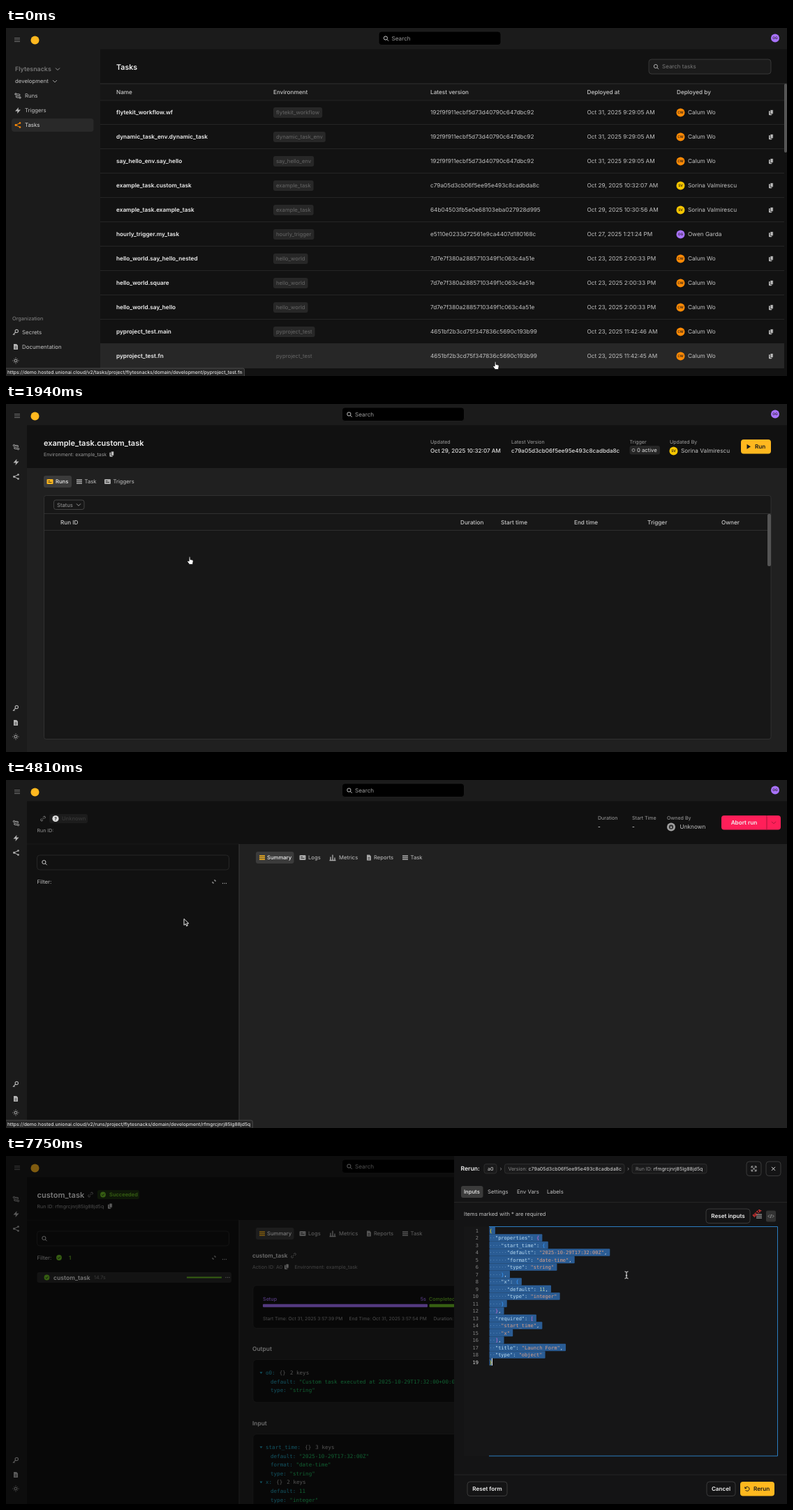
Animation of 1119 by 500 pixels, one loop 8000 ms. Source, as an HTML page:

```html
<!DOCTYPE html>
<html lang="en">
<head>
<meta charset="utf-8">
<title>Task console</title>
<style>
html, body { margin: 0; width: 100%; height: 100%; overflow: hidden; background: #1b1b1b; }
svg { display: block; }
text { white-space: pre; text-rendering: geometricPrecision; font-family: Inter, sans-serif; }
.mono, .mono text { font-family: "DejaVu Sans Mono", monospace; }
</style>
</head>
<body>
<svg id="stage" width="1119" height="500" viewBox="0 0 1119 500"></svg>
<script>
const ctx = document.createElement('canvas').getContext('2d');
const width = (s, size, weight = 400) => {
  ctx.font = `${weight} ${size}px Inter, sans-serif`;
  return ctx.measureText(s).width;
};

// Drawing helpers: text is centred vertically on y, boxes go from corner to corner
const WHITE = '#f0f0f0', SOFT = '#c2c2c2', DIM = '#858585', GREEN = '#6cc024', PURPLE = '#a872ff', GOLD = '#ffb81f';
const T = (x, y, s, size = 8.25, fill = SOFT, weight = 400, anchor = 'start') =>
  `<text x="${x}" y="${y + size * .36}" font-size="${size}" fill="${fill}" font-weight="${weight}" text-anchor="${anchor}">${s}</text>`;
const R = (x, y, x2, y2, fill, r = 0, stroke = 'none') =>
  `<rect x="${x}" y="${y}" width="${x2 - x}" height="${y2 - y}" rx="${r}" fill="${fill}" stroke="${stroke}" stroke-width=".8"/>`;
const C = (x, y, r, fill, stroke = 'none') => `<circle cx="${x}" cy="${y}" r="${r}" fill="${fill}" stroke="${stroke}"/>`;
const P = (x, y, d, stroke, fill = 'none', w = 1) =>
  `<path transform="translate(${x} ${y})" d="${d}" stroke="${stroke}" fill="${fill}" stroke-width="${w}" stroke-linejoin="round"/>`;
const hline = (x, x2, y, color = '#2a2a2a') => P(x, y, `M0 0H${x2 - x}`, color, 'none', .8);

// Icons
const copy = (x, y, c = '#bdbdbd') => R(x - 3, y - 2.5, x + 1.5, y + 3.8, c, 1) + R(x - 1, y - 4, x + 3.2, y + 2.2, c, 1, '#151515');
const link = (x, y) => P(x, y, 'M-1 1L1 -1M0 -2L1.2 -3.2A1.5 1.5 0 0 1 3.2 -1.2L2 0M0 2L-1.2 3.2A1.5 1.5 0 0 1 -3.2 1.2L-2 0', '#999', 'none', .9);
const lens = (x, y, c = '#ccc') => P(x, y, 'M2 -.5A2.6 2.6 0 1 1 -3.2 -.5A2.6 2.6 0 1 1 2 -.5M1.3 1.4L3.6 3.7', c);
const chevron = (x, y, c = '#999') => P(x, y, 'M-3 -1.5L0 1.5L3 -1.5', c);
const check = (x, y) => C(x, y, 3.9, GREEN) + P(x, y, 'M-1.8 .1L-.5 1.4L1.8 -1.2', '#151515', 'none', .9);
const failed = (x, y) => C(x, y, 3.9, '#f0392b') + P(x, y, 'M0 -2V.6M0 1.2V2', '#151515');
const dots = (x, y) => [-2.5, 0, 2.5].map(d => C(x + d, y, .65, '#aaa')).join('');
const kebab = (x, y) => [-2.8, 0, 2.8].map(d => C(x, y + d, .65, '#999')).join('');
const bars = (x, y, c) => P(x, y, 'M-4 -2.5H4M-4 0H4M-4 2.5H4', c, 'none', 1.5);
const box = (x, y, c) => R(x - 4.5, y - 3.5, x + 4.5, y + 3.5, c, 1) + P(x, y, 'M-2.5 -1H0M-2.5 1H2.5', '#222', 'none', .8);
const chart = (x, y) => P(x, y, 'M-3 4V-1M0 4V-4M3 4V0M-4.5 4H4.5', '#aaa', 'none', 1.4);
const page = (x, y, c = '#aaa') => P(x, y, 'M-3 -4H1L3 -2V4H-3Z', 'none', c) + P(x, y, 'M-1.5 0H1.5M-1.5 2H1.5', '#1b1b1b', 'none', .7);
const rerun = (x, y) => P(x, y, 'M-2.8 -1A3 3 0 1 1 -2.6 1.5M-3.2 -3V-.8H-1', '#1a1a1a');
const brackets = (x, y, c) => P(x, y, 'M-2 -2L-4 0L-2 2M2 -2L4 0L2 2M.6 -2.5L-.6 2.5', c, 'none', .8);
const flow = (x, y, c) => C(x - 3, y - 2.5, 1.2, 'none', c) + C(x + 3, y + 2.5, 1.2, 'none', c) + P(x, y, 'M-1.5 -2.5H1.5Q3.5 -2.5 3 -.8Q2.5 0 0 0T-3 .8Q-3 2.5 -1 2.5H1.5', c);
const bolt = (x, y, c) => P(x, y, 'M1 -4.5L-4 1H-.5L-1 4.5L4 -1H.5Z', 'none', c);
const share = (x, y, c) => P(x, y, 'M3 -3L-3 0L3 3', c) + C(x - 3, y, 1.4, c) + C(x + 3, y - 3, 1.3, c) + C(x + 3, y + 3, 1.3, c);
const key = (x, y) => P(x, y, 'M3.5 -1.5A2.2 2.2 0 1 1 -.9 -1.5A2.2 2.2 0 1 1 3.5 -1.5M-.2 0L-4 3.8M-2.8 2.6L-1.5 3.8', '#b5b5b5', 'none', 1.2);
const sun = (x, y) => C(x, y, 1.9, 'none', '#b5b5b5') + P(x, y, 'M0 -4.5V-3.4M0 3.4V4.5M-4.5 0H-3.4M3.4 0H4.5M-3 -3L-2.4 -2.4M3 3L2.4 2.4M3 -3L2.4 -2.4M-3 3L-2.4 2.4', '#b5b5b5', 'none', .9);

const people = {
  CW: ['Calum Wo', '#ff8a05'],
  SV: ['Sorina Valmirescu', '#f7c600'],
  OG: ['Owen Garda', PURPLE],
};
const avatar = (x, y, id) => people[id]
  ? C(x, y, 6, people[id][1]) + T(x, y, id, 4.9, '#2a2015', 600, 'middle')
  : C(x, y, 6, '#a0a0a0') + C(x, y, 3.2, '#333') + C(x, y + .4, 1.4, '#a0a0a0');
const person = (x, y, id) => avatar(x, y, id) + T(x + 10.5, y, people[id][0]);
const field = (x, y, label, value) => T(x, y, label, 7.1, '#a0a0a0') + T(x, y + 13, value, 8.1, '#e0e0e0', 500);

// Top bar and sidebar, either wide or collapsed
function shell(wide) {
  const sx = wide ? 534 : 481.5;
  let s = R(0, 0, 1119, 500, '#1b1b1b') + P(16, 17, 'M-4 -2.5H4M-4 0H4M-4 2.5H4', '#777', 'none', .9) + C(41.5, 17.5, 6, GOLD)
    + R(sx, 5, sx + 175, 24.5, '#000', 4, '#222') + lens(sx + 10.5, 15) + T(sx + 18.5, 15, 'Search', 8.2, '#9a9a9a') + avatar(1102, 14.5, 'OG');
  if (!wide) {
    return s + flow(14.5, 62, '#b5b5b5') + bolt(14.5, 83.5, '#b5b5b5') + share(14.5, 104.5, '#b5b5b5')
      + key(14, 437) + page(14, 458, '#b5b5b5') + sun(14, 478);
  }
  return s + R(8, 130, 125.5, 149, '#292929', 4)
    + T(13, 59, 'Flytesnacks', 8.9, '#777', 600) + chevron(74, 59) + T(13, 76.5, 'development', 7.8) + chevron(70, 76.5)
    + flow(17, 97.5, '#b5b5b5') + T(27, 97.5, 'Runs', 7.8) + bolt(17, 118.5, '#b5b5b5') + T(27, 118.5, 'Triggers', 7.8)
    + share(17, 139.5, '#ff8a05') + T(27, 139.5, 'Tasks', 7.8, '#ddd')
    + T(9, 417.5, 'Organization', 7.4, DIM) + key(14, 437) + T(23, 437, 'Secrets', 7.9) + page(14, 458, '#b5b5b5')
    + T(23, 458, 'Documentation', 7.9) + sun(14, 478);
}

// Task list
const HASH = ['192f9f911ecbf5d73d40790c647dbc92', 'c79a05d3cb06f5ee95e493c8cadbda8c', '64b04503fb5e0e68103eba027928d995',
  'e5110e0233d72561e9ca4407d180168c', '7d7e7f380a2885710349f1c063c4a51e', '4651bf2b3cd75f347836c5690c193b99'];
const tasks = [
  ['flytekit_workflow.wf', 0, '31, 2025 9:29:05 AM', 'CW'],
  ['dynamic_task_env.dynamic_task', 0, '31, 2025 9:29:05 AM', 'CW'],
  ['say_hello_env.say_hello', 0, '31, 2025 9:29:05 AM', 'CW'],
  ['example_task.custom_task', 1, '29, 2025 10:32:07 AM', 'SV'],
  ['example_task.example_task', 2, '29, 2025 10:30:56 AM', 'SV'],
  ['hourly_trigger.my_task', 3, '27, 2025 1:21:24 PM', 'OG'],
  ['hello_world.say_hello_nested', 4, '23, 2025 2:00:33 PM', 'CW'],
  ['hello_world.square', 4, '23, 2025 2:00:33 PM', 'CW'],
  ['hello_world.say_hello', 4, '23, 2025 2:00:33 PM', 'CW'],
  ['pyproject_test.main', 5, '23, 2025 11:42:46 AM', 'CW'],
  ['pyproject_test.fn', 5, '23, 2025 11:42:45 AM', 'CW'],
];
const heads = (y, list) => list.map(([x, s]) => T(x, y, s, 8.2, '#c8c8c8', 500)).join('');

function taskList() {
  const rows = tasks.map(([name, h, date, who], i) => {
    const y = 121.5 + 35 * i, env = name.split('.')[0];
    return T(158, y, name, 8.25, WHITE, 600) + R(383, y - 7.5, 391 + width(env, 7.75), y + 7.5, '#272727', 3) + T(387, y, env, 7.75, '#666')
      + T(608, y, HASH[h]) + T(832.5, y, 'Oct ' + date) + person(966.5, y, who) + copy(1096, y) + hline(135, 1115, y + 17);
  }).join('');
  return shell(true) + R(135, 30.5, 1119, 500, '#121212') + T(158, 56, 'Tasks', 10.7, WHITE, 600)
    + R(921, 45, 1096, 66, '#1b1b1b', 4, '#404040') + lens(931.5, 55.5, '#aaa') + T(940, 55.5, 'Search tasks', 8, '#777')
    + R(135, 80, 1119, 104, '#161616') + hline(135, 1119, 80, '#383838') + hline(135, 1115, 104)
    + heads(92.5, [[158, 'Name'], [383, 'Environment'], [608, 'Latest version'], [832.5, 'Deployed at'], [961, 'Deployed by']])
    + '<rect id="taskHover" x="135" width="980" height="35" fill="#272727"/>' + rows + R(1115, 80, 1119, 179, '#555', 2);
}

// Task detail with its runs
const runs = [
  ['rfmgrcjnrj85lg88jd5q', '14s', 'a few seconds ago', '-', 'OG'],
  ['rq4qwdm55tf5zl8mxkt5', '6s', '2 days ago', '-', 'SV'],
  ['rltxzvvch2sk75rjnrb6', '6s', '2 days ago', 'minutely'],
  ['rssldgkdqss4zcs82h49', '7s', '2 days ago', 'custom_cron'],
  ['rmf48hxnsd47jhw8jxz7', '6s', 'Oct 20, 2025 5:00 PM', 'custom_cron'],
  ['r6dh8hklhfmkdzjl8np7', '53s', 'Oct 20, 2025 2:59 PM', '-', 'OG'],
  ['r5qsmdcgwnpw66txt9sg', '5s', 'Oct 20, 2025 11:31 AM', 'minutely'],
  ['rcwv6sc55xl6hphln2nm', '5s', 'Oct 20, 2025 11:30 AM', 'minutely'],
  ['rlrwnyw5459kvrj266j2', '5s', 'Oct 20, 2025 11:29 AM', 'minutely'],
];

function taskPage() {
  const rows = runs.map(([id, took, when, trigger, who], i) => {
    const y = 199 + 35 * i, cell = (x, s) => T(x, y, s, 7.75);
    return R(78, y - 7, 98 + width(id, 7.4, 500), y + 7, '#2c2c2c', 3) + (took == '53s' ? failed : check)(87, y) + T(94, y, id, 7.4, '#ddd', 500)
      + cell(651, took) + cell(709, when) + cell(814, when) + cell(919, trigger) + avatar(1038.5, y, who) + kebab(1078, y) + hline(55, 1091, y + 17.5);
  }).join('');
  return shell(false) + R(30, 30.5, 1119, 92, '#111') + R(30, 92, 1119, 500, '#202020')
    + T(54, 56, 'example_task.custom_task', 11, WHITE, 600) + T(54, 72, 'Environment: example_task', 7, '#999') + copy(151.5, 72)
    + field(608, 54.5, 'Updated', 'Oct 29, 2025 10:32:07 AM') + field(724, 54.5, 'Latest Version', HASH[1])
    + T(893.5, 54.5, 'Trigger', 7.1, '#a0a0a0') + R(893.5, 60, 937, 72.5, '#262626', 3) + C(899, 66.3, 2, 'none', '#999') + T(904, 66.3, '0 active', 7.7, '#e0e0e0')
    + T(951, 54.5, 'Updated By', 7.1, '#a0a0a0') + person(956.5, 67.5, 'SV')
    + R(1053, 51, 1096, 71.5, GOLD, 4) + P(1064, 61.3, 'M-2.5 -3.5L3 0L-2.5 3.5Z', 'none', '#1a1a1a') + T(1073, 61.3, 'Run', 8.2, '#1a1a1a', 600)
    + R(54, 103, 94, 120, '#3b3b3b', 3) + box(63, 111.5, GOLD) + T(71, 111.5, 'Runs', 7.7, WHITE, 500) + bars(105, 111.5, '#aaa') + T(112.5, 111.5, 'Task', 7.7)
    + box(145.5, 111.5, '#aaa') + T(153.5, 111.5, 'Triggers', 7.7)
    + R(54.5, 131.5, 1096, 481.5, '#171717', 3, '#363636') + R(68.5, 138, 112, 151.5, 'none', 3, '#505050') + T(73, 144.8, 'Status', 7.7, '#999') + chevron(104, 144.8)
    + hline(54, 1096, 157.5, '#363636') + hline(54, 1091, 181.5, '#333')
    + heads(170, [[78, 'Run ID'], [651, 'Duration'], [709, 'Start time'], [814, 'End time'], [919, 'Trigger'], [1025, 'Owner']])
    + '<clipPath id="card"><rect x="54" y="150" width="1042" height="331"/></clipPath><g id="runRows" clip-path="url(#card)">'
    + '<rect id="runHover" x="55" width="1036" height="35" fill="#282828"/>' + rows + '</g>' + R(1091, 158, 1096, 233, '#555', 2);
}

// Run detail: frame, placeholder header and loaded content
const runFrame = () => shell(false) + R(30, 30.5, 1119, 500, '#111') + R(334, 92, 1119, 500, '#212121')
  + hline(30, 334, 92, '#1e1e1e') + P(334, 92, 'M0 0V408', '#383838')
  + R(44.5, 108, 319.5, 129, 'none', 4, '#2c2c2c') + lens(55, 118.5) + T(44.5, 146, 'Filter:', 7.7, '#aaa', 500)
  + P(298, 146, 'M1 -3V-1H3M-1 3V1H-3', '#aaa') + dots(313, 148.5)
  + R(358, 103, 412.5, 120, '#3b3b3b', 3) + bars(367, 111.5, GOLD) + T(374, 111.5, 'Summary', 7.7, WHITE, 500)
  + box(425, 111.5, '#aaa') + T(433, 111.5, 'Logs', 7.7) + chart(468, 111.5) + T(477, 111.5, 'Metrics', 7.7)
  + page(520, 111.5) + T(527, 111.5, 'Reports', 7.7) + bars(572, 111.5, '#aaa') + T(579.5, 111.5, 'Task', 7.7);

const runPending = () => link(53, 55.5) + R(62, 49, 117, 62, '#1c1c1c', 3) + C(71, 55.5, 4.6, '#ddd') + T(71, 55.5, '?', 6.5, '#111', 700, 'middle')
  + T(80, 55.5, 'Unknown', 7.6, '#383838', 500) + T(44.5, 72, 'Run ID:', 7, '#999')
  + field(848, 54.5, 'Duration', '-') + field(897, 54.5, 'Start Time', '-') + T(947, 54.5, 'Owned By', 7.1, '#a0a0a0') + avatar(953, 67.5) + T(965.5, 67.5, 'Unknown')
  + R(1025, 51, 1110, 71.5, '#ff1f59', 4) + T(1057.5, 61.3, 'Abort run', 8.2, WHITE, 600, 'middle') + P(1090, 51, 'M0 0V20.5', '#a8143b') + chevron(1100, 61.3, '#a8143b');

const span = (fill, s, dx = 0) => `<tspan fill="${fill}" dx="${dx}">${s}</tspan>`;
const KEY = '#24a7c4', STR = '#20c063';
const tree = (y, rows) => '<g class="mono">' + rows.map(([k, v, n], i) => {
  const cy = y + 12.55 * i;
  return n ? P(365.5, cy, 'M-2 -1.2H2L0 1.6Z', 'none', KEY) + T(372, cy, span(KEY, k + ':') + span('#aaa', ' {}', 1.5) + span('#aaa', ` ${n} keys`, 1.5), 7.57)
    : T(379, cy, span(KEY, k + ': ') + span(STR, v), 7.57);
}).join('') + '</g>';
const section = (y, name, y2) => T(353, y, name, 8.4, '#ddd', 600) + R(1036, y - 9, 1076, y + 9, '#151515', 3) + bars(1049, y, '#888')
  + R(1058, y - 7, 1074, y + 7, '#2c2c2c', 2) + brackets(1066, y, '#888') + copy(1092, y) + R(354, y + 16, 1099, y2, '#111', 5, '#2c2c2c');

const runLoaded = () => T(44.5, 56, 'custom_task', 11.1, WHITE, 600) + link(121, 55.5) + R(131, 49, 191, 62, '#1d3010', 3) + check(139, 55.5) + T(148, 55.5, 'Succeeded', 7.5, GREEN, 600)
  + T(44.5, 72, 'Run ID: ' + runs[0][0], 7, '#999') + copy(149, 72)
  + field(807, 54.5, 'Duration', '14.74s') + field(855.5, 54.5, 'Start Time', 'Oct 31, 2025 3:57:39 PM') + T(966, 54.5, 'Owned By', 7.1, '#a0a0a0') + person(972, 67.5, 'OG')
  + R(1047, 51, 1110, 71.5, GOLD, 4) + rerun(1065, 61.3) + T(1073, 61.3, 'Rerun', 8.2, '#1a1a1a', 600)
  + check(76, 146) + T(90, 146, '1', 7.7, GREEN, 600)
  + R(44.5, 167, 323, 182, '#262626', 3) + check(58.5, 174.5) + T(68, 174.5, 'custom_task', 8.6, WHITE, 600) + T(126, 174.5, '14.7s', 7.2, '#777') + R(259, 173.5, 309, 175.5, GREEN) + dots(317.5, 174.5)
  + R(1026, 104, 1096, 120, '#2b2b2b', 3) + T(1032, 111.8, 'Debug action', 7.9) + P(1088, 111.8, 'M-2.5 2.5L2.5 -2.5M-1.5 -2.5H2.5V1.5', '#bbb')
  + T(353, 143, 'custom_task', 8.25, '#ddd', 600) + link(412, 143) + T(353, 159.5, 'Action ID: A0', 7, '#888') + copy(402, 159) + T(413.5, 159.5, 'Environment: example_task', 7, '#888')
  + R(354, 186, 1099, 247.5, '#111', 5, '#2c2c2c') + T(368, 205, 'Setup', 7.2, PURPLE, 500) + T(602, 205, '5s', 7.2, PURPLE, 500, 'end') + T(606, 205, 'Completed', 7.2, GREEN, 500)
  + T(1072, 205, '10s', 7.2, GREEN, 500, 'end') + check(1079, 205) + R(368, 212.8, 604, 217.3, PURPLE, 1) + R(606.5, 212.8, 1086, 217.3, GREEN, 1)
  + T(368, 234, 'Start Time: Oct 31, 2025 3:57:39 PM', 6.7, '#999') + T(491.5, 234, 'End Time: Oct 31, 2025 3:57:54 PM', 6.7, '#999') + T(612.5, 234, 'Duration: 15s', 6.7, '#999')
  + section(276.5, 'Output', 354) + tree(311.5, [['o0', , 2], ['default', '"Custom task executed at 2025-10-29T17:32:00+00:00 with x=11"'], ['type', '"string"']])
  + section(383.5, 'Input', 510) + tree(418.5, [['start_time', , 3], ['default', '"2025-10-29T17:32:00Z"'], ['format', '"date-time"'], ['type', '"string"'],
    ['x', , 2], ['default', '11'], ['type', '"integer"']]);

// Rerun drawer with the JSON editor
const form = JSON.stringify({
  properties: { start_time: { default: '2025-10-29T17:32:00Z', format: 'date-time', type: 'string' }, x: { default: 11, type: 'integer' } },
  required: ['start_time', 'x'], title: 'Launch Form', type: 'object',
}, null, 2).split('\n');

function editor() {
  const ch = 4.214, pair = ['#ffd700', '#da70d6', '#3a9cff'];
  let depth = 0, marks = '', code = '';
  form.forEach((line, i) => {
    const y = 107 + 10.5 * i, last = i == form.length - 1, indent = line.search(/\S/);
    marks += R(692.5, y - 5.3, 692.5 + (line.length + !last) * ch, y + 5.3, '#2a5c94', 1);
    const body = line.trim().replace(/"[^"]*"(:?)|[{}[\]]|\d+/g, (s, colon) => {
      if (/^[{[]$/.test(s)) return span(pair[depth++ % 3], s);
      if (/^[}\]]$/.test(s)) return span(pair[--depth % 3], s);
      return span(colon ? '#b9dcf2' : s[0] == '"' ? '#d9a088' : '#b5cea8', s);
    });
    code += T(677, y, i + 1, 7, last ? '#ddd' : '#858585', 400, 'end')
      + `<g class="sel">${T(692.5, y, '·'.repeat(indent), 7, '#5f8dbd')}</g>` + T(692.5 + indent * ch, y, body, 7, '#ddd');
  });
  return `<g class="sel">${marks}</g><g class="mono">${code}</g><rect id="caret" x="696" y="290.5" width="1" height="10.5" fill="#eee"/>`;
}
const button = (x, x2, y, s) => R(x, y, x2, y + 20.5, '#141415', 4, '#444') + T((x + x2) / 2, y + 10.3, s, 8.1, WHITE, 600, 'middle');
const crumb = (x, x2, a, b) => R(x, 11.5, x2, 25, '#1a1a1b', 3, '#343434') + T(x + 5, 18.3, span('#8a8a8a', a) + b, 7.05, '#ddd');

const drawer = () => R(642, 0, 1119, 500, '#141415') + T(651.5, 18.3, 'Rerun:', 8.6, WHITE, 600)
  + crumb(685, 703, '', 'a0') + T(707.5, 18, '›', 8, '#888') + crumb(714.5, 886, 'Version: ', HASH[1]) + T(890, 18, '›', 8, '#888') + crumb(897, 1004, 'Run ID: ', runs[0][0])
  + R(1061, 8, 1082, 28.5, 'none', 4, '#444') + P(1071.5, 18.3, 'M1 -3.5H3.5V-1M-1 3.5H-3.5V1M-3.5 -1V-3.5H-1M3.5 1V3.5H1M-3 -3L3 3M3 -3L-3 3', '#ccc', 'none', .8)
  + R(1089, 8, 1110, 28.5, 'none', 4, '#444') + P(1099.5, 18.3, 'M-2.5 -2.5L2.5 2.5M2.5 -2.5L-2.5 2.5', '#ddd')
  + R(652, 43, 683.5, 60, '#3b3b3b', 3) + T(656, 51.3, 'Inputs', 7.7, WHITE, 500) + T(690, 51.3, 'Settings', 7.7) + T(732, 51.3, 'Env Vars', 7.7) + T(775, 51.3, 'Labels', 7.7) + hline(642, 1119, 66.5)
  + T(656, 83.3, 'Items marked with * are required', 7.6) + button(1003, 1066, 76, 'Reset inputs') + bars(1079, 86.5, '#888')
  + R(1089, 78.5, 1103, 94.5, '#333', 2) + brackets(1096, 86.5, '#aaa')
  + `<g transform="translate(1076 82) rotate(-42)">${T(0, 0, 'BETA', 5.6, '#ff3b3b', 700, 'middle')}</g>`
  + R(656, 101.5, 1105.5, 431, '#161617') + editor() + P(692, 101.5, 'M0 0H413.5V329.5H0', '#2b7cc0')
  + hline(642, 1119, 458) + button(661, 718, 468, 'Reset form') + button(1004, 1045, 468, 'Cancel')
  + R(1052, 468, 1101, 488.5, GOLD, 4) + rerun(1062, 478.3) + T(1071, 478.3, 'Rerun', 8.2, '#1a1a1a', 600);

const cursors = {
  hand: P(0, 0, 'M-1.8 1V-4.2Q-1.8 -5.4 -.9 -5.4T0 -4.2V-1.6L3.2 -.9Q4.4 -.5 4.2 .8L3.5 5.5H-1.2L-4.2 1.6Q-4 .2 -2.8 .6Z', '#111', '#fff', .8),
  arrow: P(0, 0, 'M-2.5 -5V4L-.3 2.2L1.2 5.4L2.8 4.7L1.4 1.6H4.3Z', '#fff', '#111', .9),
  beam: P(0, 0, 'M-2.5 -5Q0 -5 0 -3.5Q0 -5 2.5 -5M0 -3.5V3.5M-2.5 5Q0 5 0 3.5Q0 5 2.5 5M-1.2 .8H1.2', '#eee', 'none', 1),
};

const group = (id, s) => `<g id="${id}">${s}</g>`;
const $ = id => document.getElementById(id);
$('stage').innerHTML = group('list', taskList()) + group('task', taskPage())
  + group('run', runFrame() + group('pending', runPending()) + group('loaded', runLoaded()))
  + group('status', '<rect x="-2" y="489" height="13" rx="2" fill="#262626" stroke="#555" stroke-width=".8"/>' + T(2, 494.3, '', 6.8, '#e0e0e0', 500))
  + '<rect id="shade" width="1119" height="500"/>' + group('drawer', drawer())
  + group('pointer', Object.entries(cursors).map(([id, s]) => group(id, s)).join(''));

// Piecewise linear track of [time, value, ...]
function track(t, pts) {
  const i = pts.findIndex(p => p[0] > t);
  if (i <= 0) return pts[i < 0 ? pts.length - 1 : 0].slice(1);
  const a = pts[i - 1], b = pts[i], k = (t - a[0]) / (b[0] - a[0]);
  return a.slice(1).map((v, j) => v + (b[j + 1] - v) * k);
}
const path = [[250, 702, 485], [435, 672, 428], [560, 609, 348], [1000, 304, 217], [1062, 286, 220], [1380, 264, 225], [2687, 264, 225],
  [3500, 258, 206], [3690, 258, 206], [3810, 257.5, 204.5], [4940, 257.5, 204.5], [5250, 420, 190], [5700, 900, 95], [6120, 1082, 63],
  [6375, 1082, 63], [6600, 960, 130], [6812, 889, 171]];
const slide = [[6187, 1119], [6250, 826], [6312, 655], [6375, 642]];
const fade = [[6125, 0], [6187, .3], [6250, .5]];

const show = (id, on) => $(id).style.display = on ? '' : 'none';
const hoverRow = (y, top) => Math.floor((y - 4 - top) / 35);

function status(s) {
  show('status', s);
  if (!s) return;
  let url = 'https://demo.hosted.unionai.cloud/v2/' + s;
  if (width(url, 6.8, 500) > 366) {
    while (width(url + '...', 6.8, 500) > 366) url = url.slice(0, -1);
    url += '...';
  }
  const [bar, label] = $('status').children;
  label.textContent = url;
  bar.setAttribute('width', width(url, 6.8, 500) + 7);
}

function draw(ms) {
  const t = Math.floor((ms + 5) / 62.5) * 62.5;
  const [x, y] = track(t, path), lagY = track(t - 60, path)[1];
  const onList = t < 1750, onTask = !onList && t < 4810, onRun = t >= 4810;
  show('list', onList);
  show('task', onTask);
  show('run', onRun);
  show('runRows', t >= 2000);
  show('pending', t < 5120);
  show('loaded', t >= 5120);

  const row = hoverRow(lagY, 103.5), run = hoverRow(lagY, 181.5);
  const base = '/project/flytesnacks/domain/development/';
  $('taskHover').setAttribute('y', 103.5 + 35 * row);
  $('runHover').setAttribute('y', 181.5 + 35 * run);
  status(onList ? 'tasks' + base + tasks[row][0]
    : onTask ? t >= 2000 && 'runs' + base + runs[run][0]
    : t < 5120 && 'runs' + base + runs[0][0]);

  $('shade').setAttribute('opacity', track(t, fade)[0]);
  $('drawer').setAttribute('transform', `translate(${track(t, slide)[0] - 642} 0)`);
  const selected = t >= 7000;
  document.querySelectorAll('.sel').forEach(g => g.style.display = selected ? '' : 'none');
  show('caret', selected && (t < 7370 || t >= 7680));

  const shape = !onRun ? 'hand' : t > 6375 && y > 101 ? 'beam' : 'arrow';
  for (const id in cursors) show(id, id == shape);
  $('pointer').setAttribute('transform', `translate(${x} ${y})`);
}

const start = performance.now();
(function loop() {
  draw((performance.now() - start) % 8000);
  requestAnimationFrame(loop);
})();
</script>
</body>
</html>
```
